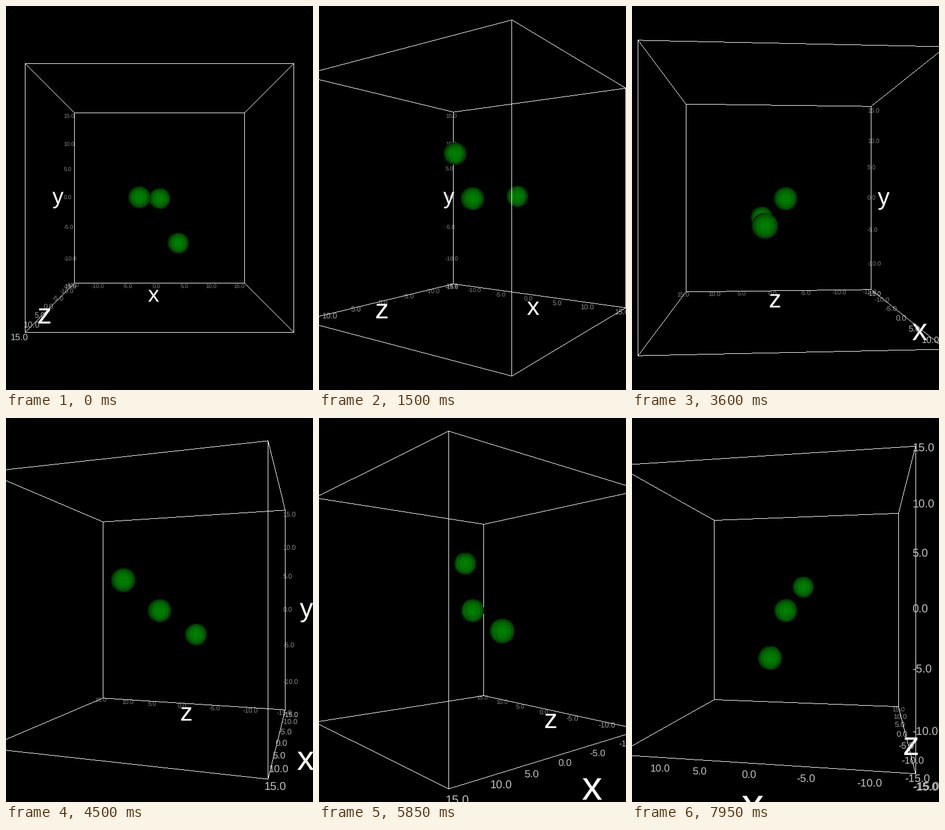
Write a matplotlib script that moves like this. It is 536 px wide and 670 px high and loops after 8000 ms.

```python
import numpy as np
import matplotlib.pyplot as plt
from matplotlib.animation import FuncAnimation
from matplotlib.collections import PolyCollection
from matplotlib.patches import PathPatch
from matplotlib.path import Path

W, H = 536, 670
FOCAL = H / 2 / np.tan(np.radians(22.5))
HALF = 15
STEP_MS, TICK_MS, LOOP_MS = 150, 50, 8000
EM = 1.02          # tick label size in world units
LETTER_EM = 4.1
RADIUS = 1.47


def camera(step):
    """Yaw and distance; the very first view stands a little further back."""
    return np.radians(3.6 * step), 66.7 if step == 0 else 60.0


def to_view(points, step):
    """World points to (right, up, depth)."""
    yaw, dist = camera(step)
    x, y, z = np.moveaxis(np.asarray(points, float), -1, 0)
    right = x * np.cos(yaw) - z * np.sin(yaw)
    depth = dist - x * np.sin(yaw) - z * np.cos(yaw)
    return np.stack([right, y, depth], -1)


def to_screen(view):
    scale = FOCAL / view[..., 2]
    return np.stack([W / 2 + view[..., 0] * scale,
                     H / 2 - view[..., 1] * scale], -1)


def unproject(step, px, py, depth):
    yaw, dist = camera(step)
    right = (px + 0.5 - W / 2) * depth / FOCAL
    up = (H / 2 - py - 0.5) * depth / FOCAL
    toward = dist - depth
    return np.array([right * np.cos(yaw) + toward * np.sin(yaw), up,
                     toward * np.cos(yaw) - right * np.sin(yaw)])


class Orbit:
    """Body circling one axis, about 40 degrees per step, through sightings."""

    def __init__(self, sightings, u, v, axis):
        self.u, self.v, self.axis = u, v, axis
        self.steps = [s[0] for s in sightings]
        pts = np.array([unproject(*s) for s in sightings])
        self.radius = np.hypot(pts[:, u], pts[:, v])
        self.height = pts[:, axis]
        raw = np.arctan2(pts[:, v], pts[:, u])
        phase = [raw[0]]
        for angle, gap in zip(raw[1:], np.diff(self.steps)):
            expected = phase[-1] + np.radians(40) * gap
            phase.append(angle + 2 * np.pi * np.round((expected - angle) / (2 * np.pi)))
        self.phase = phase

    def at(self, step):
        phase, radius, height = (np.interp(step, self.steps, track)
                                 for track in (self.phase, self.radius, self.height))
        p = np.zeros(3)
        p[self.u], p[self.v] = radius * np.cos(phase), radius * np.sin(phase)
        p[self.axis] = height
        return p


# step, screen x, screen y, depth
flat_orbit = Orbit([(0, 232, 333, 63.5), (10, 345.5, 331.5, 64.3), (18, 250, 370.5, 67.5),
                    (30, 331, 377, 64.2), (39, 319, 371, 55.8), (47, 329, 383, 64.5),
                    (53, 298, 294.5, 65.3)], 0, 2, 1)
steep_orbit = Orbit([(0, 300, 413, 67.4), (10, 237, 257, 62), (18, 268, 315, 54.2),
                     (30, 204, 282, 57.8), (39, 254.5, 253.5, 63), (47, 190, 372, 63),
                     (53, 240.5, 418, 58)], 0, 1, 2)


def sphere_mesh(n_lon=16, n_lat=12):
    lon = np.linspace(0, 2 * np.pi, n_lon + 1)
    lat = np.linspace(-np.pi / 2, np.pi / 2, n_lat + 1)

    def point(a, b):
        return [np.cos(b) * np.cos(a), np.sin(b), np.cos(b) * np.sin(a)]

    quads = np.array([[point(lon[i], lat[j]), point(lon[i + 1], lat[j]),
                       point(lon[i + 1], lat[j + 1]), point(lon[i], lat[j + 1])]
                      for i in range(n_lon) for j in range(n_lat)])
    normals = quads.mean(1)
    return quads, normals / np.linalg.norm(normals, axis=1, keepdims=True)


def hairline(start, end):
    """Stair-stepped line of single pixels, as one compound path."""
    major = int(abs(end[1] - start[1]) > abs(end[0] - start[0]))
    a, b = sorted((start, end), key=lambda p: p[major])
    along = np.arange(max(0, np.floor(a[major])),
                      min((W, H)[major] - 1, np.floor(b[major])) + 1)
    across = np.floor(np.interp(along + 0.5, [a[major], b[major]],
                                [a[1 - major], b[1 - major]]))
    pixels = np.stack([across, along] if major else [along, across], -1)
    square = np.array([(0.2, 0.2), (0.8, 0.2), (0.8, 0.8), (0.2, 0.8), (0.2, 0.2)])
    codes = [Path.MOVETO] + [Path.LINETO] * 3 + [Path.CLOSEPOLY]
    return Path((pixels[:, None] + square).reshape(-1, 2), codes * len(pixels))


QUADS, NORMALS = sphere_mesh()

corners = [np.array([x, y, z]) * HALF for x in (-1, 1) for y in (-1, 1) for z in (-1, 1)]
EDGES = [(a, b) for i, a in enumerate(corners) for b in corners[i + 1:]
         if np.count_nonzero(a != b) == 1]


def text_width(text):
    return sum({"-": 0.333, ".": 0.278}.get(c, 0.556) for c in text)


def tick_anchors():
    for value in range(-15, 16, 5):
        text = f"{value:.1f}"
        extra = text_width(text) - 1.39
        along = value - 1.05 * extra
        yield text, (along, -15.85, -15.85)
        yield text, (-15.85, along, -15.85)
        yield text, (-15.25, -15.5, value + 0.6 - 0.6 * extra)


LETTERS = [("x", (-0.75, -17.92, -18.3)), ("y", (-18.3, 0, -18.3)),
           ("z", (-16.1, -16.9, 0.4))]

plt.rcParams["font.family"] = "Liberation Sans"
plt.rcParams["text.hinting"] = "none"
fig = plt.figure(figsize=(W / 100, H / 100), dpi=100, facecolor="black")
ax = fig.add_axes([0, 0, 1, 1])
ax.set(xlim=(0, W), ylim=(H, 0))
ax.axis("off")

lines = [ax.add_patch(PathPatch(Path([(0, 0)]), facecolor="white", linewidth=0,
                                edgecolor="none", antialiased=False, snap=False))
         for _ in EDGES]

# text artist, anchor, screen-plane offset, size in world units
labels = [(ax.text(0, 0, s, color="#c0c0c0", ha="left", va="baseline"),
           p, (-1.27, -0.26), EM) for s, p in tick_anchors()]
labels += [(ax.text(0, 0, s, color="white", ha="center", va="baseline"),
            p, (-0.33, -1.06), LETTER_EM) for s, p in LETTERS]

balls = [PolyCollection([], linewidths=0, antialiaseds=False) for _ in range(3)]
for ball in balls:
    ax.add_collection(ball, autolim=False)


def draw_ball(ball, center, step):
    middle = to_view(center, step)
    sight = -middle * [1, 1, -1]
    sight = sight / np.linalg.norm(sight)
    turned = to_view(NORMALS, step)
    turned[:, 2] = camera(step)[1] - turned[:, 2]
    facing = turned @ sight
    seen = facing > 0
    ball.set_verts(to_screen(to_view(center + RADIUS * QUADS[seen], step)))
    green = 0.1 + 0.4 * facing[seen]
    ball.set_facecolor(np.stack([0 * green, green, 0 * green], -1))
    ball.set_zorder(100 - middle[2])


def draw(frame):
    step = frame * TICK_MS // STEP_MS
    for line, edge in zip(lines, EDGES):
        view = to_view(edge, step)
        line.set_path(hairline(*to_screen(view)))
        line.set_zorder(100 - view[:, 2].mean())
    for text, anchor, (dx, dy), em in labels:
        view = to_view(anchor, step)
        size = em * FOCAL / view[2]
        text.set_position(to_screen(view + [dx, dy, 0]))
        text.set_fontsize(size * 0.72)
        text.set_alpha(np.clip(size / 16, 0.7, 1))  # small print fades
        text.set_zorder(100 - view[2])
    centers = [np.array([0, -0.06, 0]), flat_orbit.at(step), steep_orbit.at(step)]
    for ball, center in zip(balls, centers):
        draw_ball(ball, center, step)
    return lines + balls + [label[0] for label in labels]


anim = FuncAnimation(fig, draw, frames=LOOP_MS // TICK_MS, interval=TICK_MS,
                     repeat=True, repeat_delay=0, blit=False)
plt.show()
```
